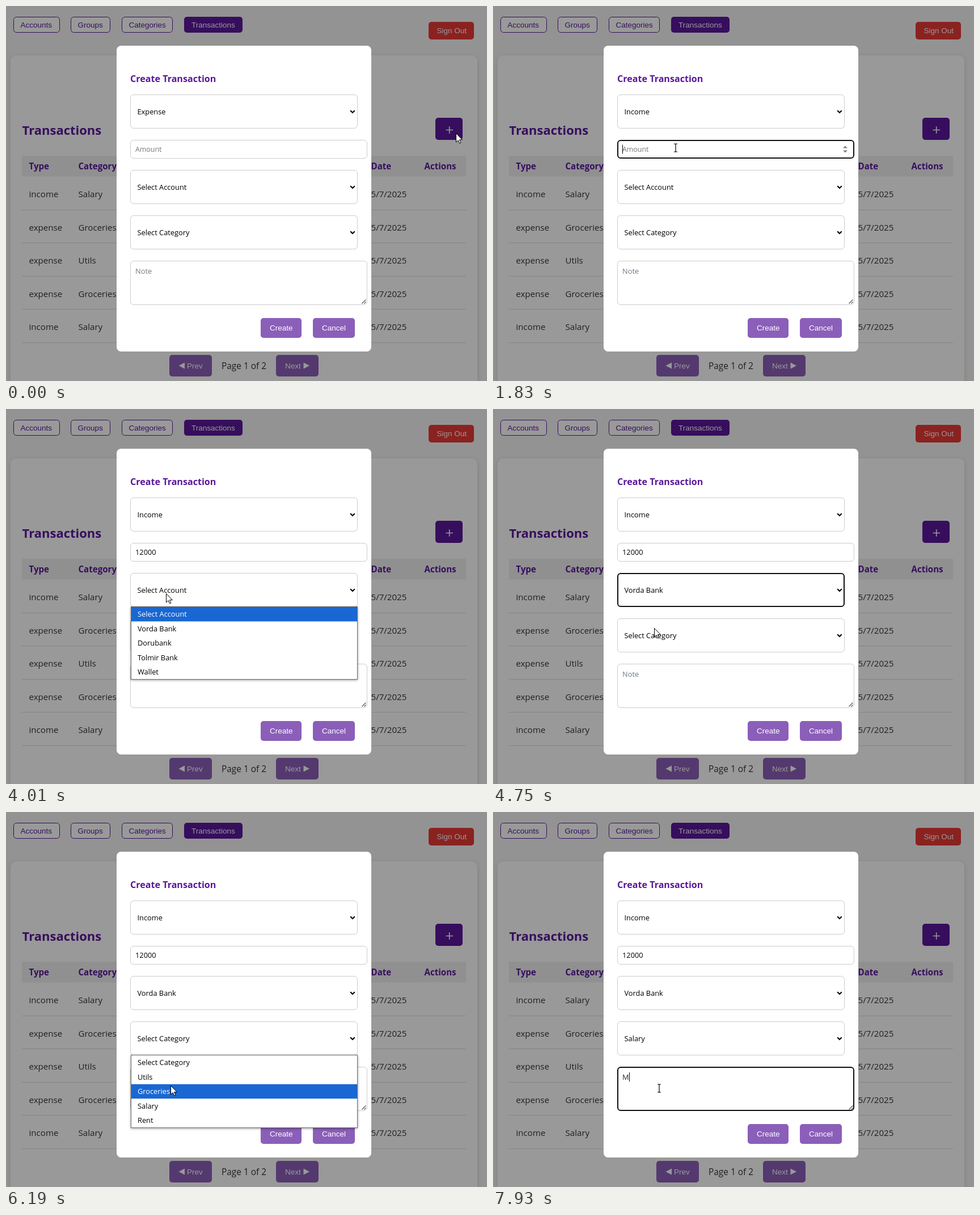
These frames come from a looping animation (848 by 661 pixels, 8 s). An HTML page:

```html
<!DOCTYPE html>
<html lang="en">
<head>
<meta charset="utf-8">
<title>Create Transaction</title>
<style>
  html, body { margin: 0; width: 100%; height: 100%; overflow: hidden; background: #939393; }
  svg { display: block; width: 848px; height: 661px; font: 12.8px "Open Sans", "Noto Sans", sans-serif; }
  .btn { font: 13.5px "Liberation Sans", Arial, sans-serif; }
  .cell { font-size: 15.1px; }
  .head { font-size: 15.1px; font-weight: 700; }
  .card { filter: drop-shadow(0 2px 4px rgba(0, 0, 0, .12)); }
  .list { filter: drop-shadow(0 1px 2px rgba(0, 0, 0, .4)); }
</style>
</head>
<body>
<svg viewBox="0 0 848 661">
  <g id="page"></g>
  <rect width="848" height="661" fill="#000" opacity=".4"/>
  <g id="modal"></g>
  <g id="form"></g>
</svg>
<script>
const LOOP = 8000, PURPLE = '#5a189a', LILAC = '#8b5fb9', ITEM_H = 25.4;
const byId = id => document.getElementById(id);

const rect = (x, y, w, h, fill, r = 0, extra = '') =>
  `<rect x="${x}" y="${y}" width="${w}" height="${h}" rx="${r}" fill="${fill}" ${extra}/>`;
const text = (x, y, str, fill = '#000', extra = '') =>
  `<text x="${x}" y="${y}" fill="${fill}" ${extra}>${str}</text>`;
const path = (d, fill, extra = '') => `<path d="${d}" fill="${fill}" ${extra}/>`;
const button = (x, y, w, h, label, textX, fill, color = '#fff', extra = '') =>
  rect(x, y, w, h, fill, 5, extra) + text(textX, y + h / 2 + 4.7, label, color, 'class="btn"');

function drawPage() {
  const tab = (x, w, label) =>
    button(x + .5, 19.5, w - 1, 27, label, x + 12.5, '#fff', PURPLE, `stroke="${PURPLE}"`);
  const rows = [['income', 'Salary'], ['expense', 'Groceries'], ['expense', 'Utils'],
                ['expense', 'Groceries'], ['income', 'Salary']];
  const columns = [[40.5, 'Type'], [127.5, 'Category'], [643.5, 'Date'], [737.5, 'Actions']];
  return rect(0, 0, 848, 661, '#f4f4f4')
    + rect(8, 87, 823, 600, '#fff', 10, 'class="card"')
    + tab(13, 82, 'Accounts') + tab(114, 70, 'Groups') + tab(204, 90, 'Categories')
    + button(314, 19, 103, 28, 'Transactions', 327, PURPLE)
    + button(745, 28, 80, 31, 'Sign Out', 759.5, '#e53935')
    + text(28.5, 227, 'Transactions', PURPLE, 'font-size="22" font-weight="700"')
    + rect(757, 197, 48, 39, PURPLE, 5)
    + path('M775.5 218.5h12.5M781.7 212.2v12.5', 'none', 'stroke="#fff" stroke-width="1.6"')
    + rect(28, 264, 783, 36.5, '#f0f0f0')
    + columns.map(([x, label]) => text(x, 288, label, PURPLE, 'class="head"')).join('')
    + rows.map(([type, category], i) => {
        const y = 337 + i * 58.6;
        return text(40.5, y, type, '#333', 'class="cell"')
          + text(127.5, y, category, '#333', 'class="cell"')
          + text(643.5, y, '5/7/2025', '#333', 'class="cell"')
          + rect(28, Math.round(y + 21.6), 783, 1, '#ddd');
      }).join('')
    + button(288, 615, 75, 38, 'Prev', 319, LILAC)
    + path('M304.5 634l10.5-5.5v11z', '#fff')
    + text(380, 640, 'Page 1 of 2', '#333', 'font-size="15.4"')
    + button(476, 615, 75, 38, 'Next', 492, LILAC)
    + path('M535 634l-10.5-5.5v11z', '#fff');
}

function drawModal() {
  return rect(195, 70, 449, 539, '#fff', 8)
    + text(219, 133.5, 'Create Transaction', PURPLE, 'font-size="16.1" font-weight="700"')
    + button(449, 550, 72, 35, 'Create', 465, LILAC)
    + button(541, 550, 74, 35, 'Cancel', 557, LILAC);
}

// [start, end, steps, x, y]: the pointer reaches x, y in even steps
const moves = [
  [130, 970, 7, 322, 174], [1250, 1540, 3, 322, 250], [2120, 2120, 1, 319, 254],
  [2430, 2430, 1, 300, 230], [3720, 3870, 2, 282, 325], [4150, 4600, 4, 284, 386],
  [5040, 5460, 4, 298, 408], [5910, 6190, 3, 290, 482], [6340, 6750, 4, 291, 517],
  [7050, 7350, 3, 293, 487]
];

function pointerAt(t) {
  let x = 793, y = 224;
  for (const [start, end, steps, toX, toY] of moves) {
    if (t < start) break;
    const done = end > start ? Math.floor((t - start) / (end - start) * (steps - 1) + 1e-6) : steps;
    const p = Math.min(steps, done + 1) / steps;
    const k = steps > 4 ? p * p * (3 - 2 * p) : p;
    x += (toX - x) * k;
    y += (toY - y) * k;
  }
  return { x, y };
}

const selects = [
  { y: 156, options: ['Expense', 'Income'], pick: 1, open: 1120, close: 1690, blur: 1830 },
  { y: 289, options: ['Select Account', 'Vorda Bank', 'Dorubank', 'Tolmir Bank', 'Wallet'],
    pick: 1, open: 4010, close: 4750, blur: 5590 },
  { y: 369, options: ['Select Category', 'Utils', 'Groceries', 'Salary', 'Rent'],
    pick: 3, open: 5590, close: 7050, blur: 7350 }
];

const within = (t, from, to) => t >= from && t < to;
const isOpen = (s, t) => within(t, s.open, s.close);

const box = (y, w, h, focused) => focused
  ? rect(220, y + 1, w - 2, h - 2, '#fff', 5, 'stroke="#101010" stroke-width="2"')
  : rect(219.5, y + .5, w - 1, h - 1, '#fff', 5.5, 'stroke="#ccc"');

function drawSelect(s, t) {
  const chosen = s.options[t >= s.close ? s.pick : 0];
  return box(s.y, 401, 60, within(t, s.close, s.blur))
    + text(231.5, s.y + 35.2, chosen)
    + path(`M607.2 ${s.y + 28.2}l3.8 3.8 3.8-3.8`, 'none', 'stroke="#000" stroke-width="2"');
}

function drawList(s, pointer) {
  const top = s.y + 60, height = s.options.length * ITEM_H;
  const hover = Math.max(0, Math.floor((pointer.y - top) / ITEM_H));
  const items = s.options.map((label, i) => {
    const y = top + i * ITEM_H, active = i === hover;
    return (active ? rect(220.5, y, 399, ITEM_H, '#1967d2') : '')
      + text(232, y + 17.4, label, active ? '#fff' : '#000');
  }).join('');
  const frame = fill => rect(220.5, top - .5, 399, height + 1, fill, 0, 'stroke="#6b6b6b"');
  return `<g class="list">${frame('#fff')}</g>${items}${frame('none')}`;
}

const caret = (x, y) => rect(x, y, 1, 16, '#000');

function drawAmount(t) {
  const focused = within(t, 1830, 4010);
  const typed = '12000'.slice(0, t < 2730 ? 0 : t < 2870 ? 1 : t < 3000 ? 2 : t < 3130 ? 3 : 5);
  const caretOn = within(t, 1830, 2430) || within(t, 2730, 3720);
  return box(236, 418, 33, focused)
    + (typed ? text(228, 257, typed) : text(228, 257, 'Amount', '#757575', 'font-size="12.4"'))
    + (focused ? path('M617 250.5l4-4 4 4zM617 254.5l4 4 4-4z', '#7d7d7d') : '')
    + (caretOn ? caret(228 + typed.length * 7.4, 244.5) : '');
}

function drawNote(t) {
  const typed = t >= 7930;
  return box(449, 418, 78, t >= 7350)
    + text(228, 472, typed ? 'M' : 'Note', typed ? '#1f2937' : '#6f7885')
    + path('M627.5 524.5l7-7M631.5 524.5l3-3', 'none', 'stroke="#555" stroke-width="1.2"')
    + (typed ? caret(240, 459) : within(t, 7350, 7800) ? caret(228, 459) : '');
}

function drawPointer({ x, y }, listOpen) {
  const overText = !listOpen && x < 637 && (within(y, 236, 269) || within(y, 449, 527));
  const shape = overText
    ? path('M-3-7h2.3l.7.7.7-.7H3M0-6.5v13M-3 7h2.3l.7-.7.7.7H3', 'none', 'stroke="#000" stroke-width="1.2"')
    : path('M.5.5v15.5l3.6-3.4 2.5 5.4 2.3-1-2.4-5.3h4.9z', '#fff', 'stroke="#000"');
  return `<g transform="translate(${Math.round(x)} ${Math.round(y)})">${shape}</g>`;
}

let shown = '';
function render(now) {
  const t = now % LOOP, pointer = pointerAt(t);
  const opened = selects.find(s => isOpen(s, t));
  const markup = selects.map(s => drawSelect(s, t)).join('') + drawAmount(t) + drawNote(t)
    + (opened ? drawList(opened, pointer) : '') + drawPointer(pointer, opened);
  if (markup !== shown) byId('form').innerHTML = shown = markup;
}

function loop() {
  render(performance.now());
  requestAnimationFrame(loop);
}

byId('page').innerHTML = drawPage();
byId('modal').innerHTML = drawModal();
loop();
</script>
</body>
</html>
```
